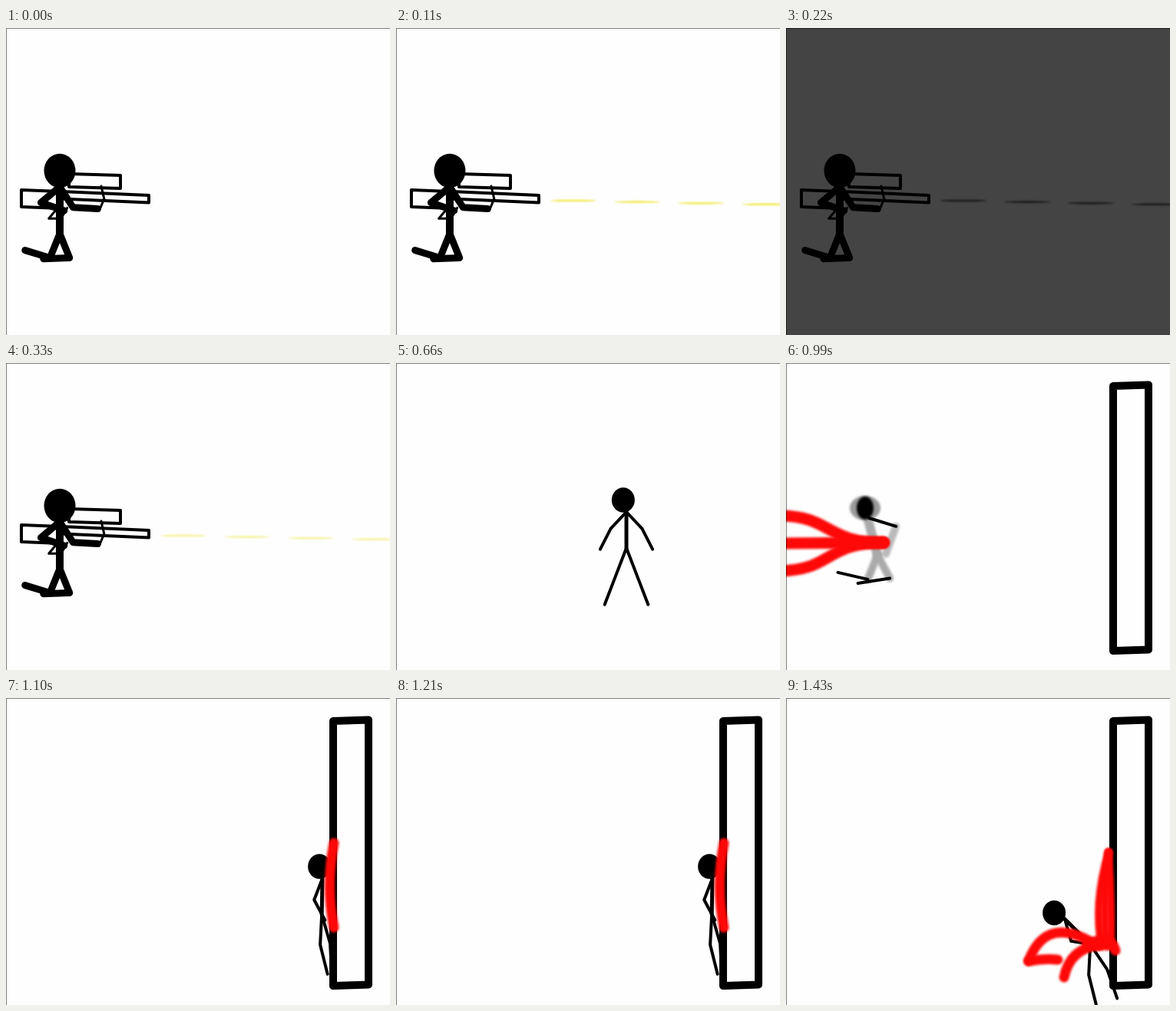
An HTML page with a canvas for the animation above (1.54 s loop, 500 px wide and 400 px high).

```html
<!DOCTYPE html>
<html lang="en">
<head>
<meta charset="utf-8">
<title>Stick figure shot</title>
<style>
html, body { margin: 0; height: 100%; overflow: hidden; background: #fefefe; }
canvas { display: block; }
</style>
</head>
<body>
<canvas id="stage" width="500" height="400"></canvas>
<script>
const ctx = document.getElementById('stage').getContext('2d');
const STEP = 110, STEPS = 14;

// Poses: neck x, neck y, torso angle, arm angles, leg angles (degrees, 90 is down)
const AIMING = [70, 207, 90, [[140, 19], [57, 3]], [[112, 197], [68, 178]]];
const STANDING = [300, 194, 90, [[133, 117], [47, 63]], [[111, 111], [69, 69]]];
const ON_WALL = [412, 235, 91, [[111, 62]], [[93, 76], [74, 87]]];
const SLUMPED = [363, 288, 45, [[74, 9]], [[93, 76], [56, 71]]];

const SHOOTER = { torso: 61, arm: 32, leg: 34, head: 20.5, neck: 21, tilt: 0, width: 9 };
const VICTIM = { torso: 47, arm: 30, leg: 39.5, head: 15, neck: 16, tilt: 15, width: 4 };

const polar = (x, y, angle, length) => {
  const a = angle * Math.PI / 180;
  return [x + length * Math.cos(a), y + length * Math.sin(a)];
};

const mix = (a, b, k) =>
  Array.isArray(a) ? a.map((v, i) => mix(v, b[i], k)) : a + (b - a) * k;

function stroke(width, color = '#000') {
  ctx.lineWidth = width;
  ctx.strokeStyle = color;
  ctx.stroke();
}

// Joined bones of equal length; returns the far end
function chain(x, y, angles, length, width, color) {
  ctx.beginPath();
  ctx.moveTo(x, y);
  for (const angle of angles) {
    [x, y] = polar(x, y, angle, length);
    ctx.lineTo(x, y);
  }
  stroke(width, color);
  return [x, y];
}

function oval(x, y, rx, ry, color = '#000') {
  ctx.beginPath();
  ctx.ellipse(x, y, rx, ry, 0, 0, Math.PI * 2);
  ctx.fillStyle = color;
  ctx.fill();
}

function figure([x, y, torso, arms, legs], build) {
  const hip = chain(x, y, [torso], build.torso, build.width + 1);
  for (const arm of arms) chain(x, y, arm, build.arm, build.width);
  for (const leg of legs) chain(...hip, leg, build.leg, build.width);
  const head = polar(x, y, torso + 180 - build.tilt, build.neck);
  oval(...head, build.head, build.head * 1.08);
}

// Four-sided outline with upright ends
function tube(x1, y1, x2, y2, height, width) {
  ctx.beginPath();
  ctx.moveTo(x1, y1);
  ctx.lineTo(x2, y2);
  ctx.lineTo(x2, y2 + height);
  ctx.lineTo(x1, y1 + height);
  ctx.closePath();
  stroke(width);
}

const wall = () => tube(426, 30, 472, 28.5, 345, 10);

function blurred(radius, paint) {
  ctx.save();
  ctx.filter = `blur(${radius}px)`;
  paint();
  ctx.restore();
}

function blood(x1, y1, cx, cy, x2, y2, width = 13) {
  ctx.beginPath();
  ctx.moveTo(x1, y1);
  ctx.quadraticCurveTo(cx, cy, x2, y2);
  blurred(1.6, () => stroke(width, '#ff0808'));
}

function tracers(alpha, color) {
  blurred(.8, () => {
    ctx.globalAlpha = alpha;
    for (let i = 0; i < 4; i++) oval(231 + 83 * i, 225 + 1.6 * i, 30, 1.3, color);
  });
}

function aim(step) {
  const dark = step === 2;
  if (step && !dark) tracers(1 - step / 6, '#efe52c');
  tube(82, 190, 149, 192, 17, 4);
  tube(72, 213, 186, 218, 9.5, 4);
  tube(20, 211, 70, 213, 22, 4);
  chain(124, 206, [77, 113], 17, 3);
  chain(66, 236, [130, 0, -60], 16, 3);
  figure(AIMING, SHOOTER);
  if (dark) {
    ctx.fillStyle = 'rgba(0,0,0,.73)';
    ctx.fillRect(0, 0, 500, 400);
    tracers(.9, '#141414');
  }
}

// Motion-blurred body with three streams behind it
function flying(dx) {
  ctx.save();
  ctx.translate(dx, 0);
  let knees;
  blurred(1.5, () => {
    const hip = chain(107, 205, [75], 47, 12, '#aaa');
    chain(143, 213, [110], 38, 10, '#bbb');
    knees = [112, 62].map(angle => chain(...hip, [angle], 34, 10, '#aaa'));
    oval(103, 189, 20, 16, '#999');
    oval(103, 189, 11, 15);
  });
  blurred(.6, () => {
    chain(108, 202, [17], 37, 4);
    chain(...knees[0], [193], 40, 4);
    chain(...knees[1], [171], 42, 4);
  });
  blurred(1.6, () => {
    for (const side of [-1, 0, 1]) {
      const y = 235 + 36 * side;
      ctx.beginPath();
      ctx.moveTo(-10, y);
      ctx.bezierCurveTo(60, y, 50, 234, 127, 234);
      stroke(15, '#ff0808');
    }
  });
  ctx.restore();
}

// slide goes from pinned on the wall (0) to slumped on the floor (1)
function crash(slide) {
  wall();
  figure(mix(ON_WALL, SLUMPED, slide), VICTIM);
  if (slide < 1) {
    blood(427, 189 + 10 * slide, 416, 245, 427, 299 + 30 * slide);
    return;
  }
  for (let i = 0; i < 3; i++) blood(420, 201, 400 + 12 * i, 268, 411 + 6 * i, 324, 10);
  blood(429, 329, 422, 305, 392, 322);
  blood(406, 323, 340, 280, 316, 342);
  blood(316, 343, 335, 339, 354, 341);
  blood(408, 322, 370, 326, 362, 364);
}

function draw(step) {
  ctx.fillStyle = '#fefefe';
  ctx.fillRect(0, 0, 500, 400);
  if (step < 6) aim(step);
  else if (step < 8) {
    figure(STANDING, VICTIM);
    if (step === 7) blood(300, 215, 270, 218, 245, 230);
  } else if (step === 8) flying(250);
  else if (step === 9) {
    wall();
    flying(0);
  } else crash(Math.max(0, step - 11) / 2);
  ctx.fillStyle = 'rgba(0,0,0,.5)';
  ctx.fillRect(0, 0, 500, 1);
  ctx.fillRect(0, 1, 1, 399);
}

ctx.lineCap = ctx.lineJoin = 'round';
const start = performance.now();
function tick() {
  draw(Math.floor((performance.now() - start) / STEP) % STEPS);
  requestAnimationFrame(tick);
}
tick();
</script>
</body>
</html>
```
